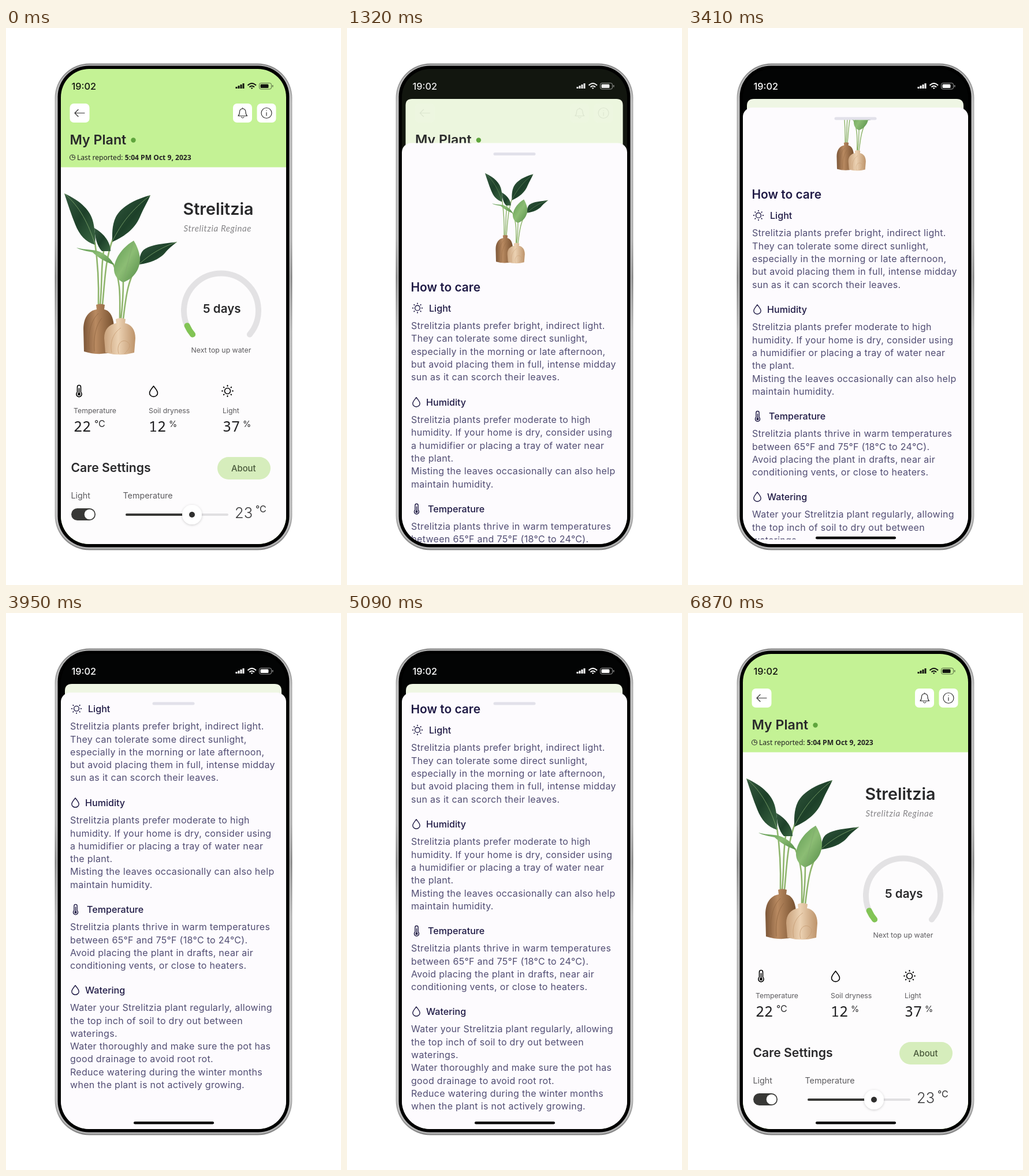
An HTML page for the animation above (6920 ms loop, 580x966 px).

```html
<!DOCTYPE html>
<html lang="en">
<head>
<meta charset="utf-8">
<title>Plant care app</title>
<style>
html, body { margin: 0; width: 100%; height: 100%; overflow: hidden; background: #fff }
svg { display: block; width: 580px; height: 966px; font-family: Inter, sans-serif }
.bold { font-weight: 600; fill: #29292b }
.label { font-size: 12.3px; fill: #5c5b5e }
.number { font: 25px "Noto Sans Mono", monospace; fill: #1f1f21 }
.unit { font-size: 16px; fill: #2c2c2e }
.percent { font-size: 14.5px; fill: #2c2c2e }
.setting { font-size: 14.3px; fill: #5c5b5e }
.icon { fill: none; stroke: currentColor; stroke-width: 1.6; stroke-linecap: round; stroke-linejoin: round }
.thin { fill: none; stroke: #333; stroke-width: 1.2; stroke-linecap: round; stroke-linejoin: round }
.stem { fill: none; stroke: #8fb56c; stroke-width: 2.6 }
.head { font-size: 16.1px; font-weight: 500; fill: #1f1a45 }
.para { font-size: 16px; letter-spacing: .3px; fill: #514d73 }
</style>
</head>
<body>
<svg viewBox="0 0 580 966">
<defs>
  <linearGradient id="metal" x2="0" y2="1">
    <stop stop-color="#858585"/><stop offset=".08" stop-color="#b0b0b0"/>
    <stop offset=".36" stop-color="#a9a9a9"/><stop offset=".44" stop-color="#7a7a7a"/>
    <stop offset=".55" stop-color="#b4b4b4"/>
    <stop offset=".93" stop-color="#b0b0b0"/><stop offset="1" stop-color="#808080"/>
  </linearGradient>
  <linearGradient id="dark" x2="1" y2="1">
    <stop stop-color="#34593f"/><stop offset=".5" stop-color="#1d4029"/><stop offset="1" stop-color="#3c6843"/>
  </linearGradient>
  <linearGradient id="pale" x2="1" y2="1">
    <stop stop-color="#5f9a52"/><stop offset=".5" stop-color="#8cbd74"/><stop offset="1" stop-color="#548c48"/>
  </linearGradient>
  <linearGradient id="walnut">
    <stop stop-color="#7c5638"/><stop offset=".4" stop-color="#b98a61"/><stop offset="1" stop-color="#76502f"/>
  </linearGradient>
  <linearGradient id="birch">
    <stop stop-color="#c9a27c"/><stop offset=".45" stop-color="#ecd2b3"/><stop offset="1" stop-color="#bd936a"/>
  </linearGradient>
  <filter id="soft" x="-50%" y="-50%" width="200%" height="200%">
    <feDropShadow dx="0" dy="1" stdDeviation="2" flood-opacity=".2"/>
  </filter>
  <clipPath id="screen"><rect x="95" y="71" width="390" height="824" rx="49"/></clipPath>
  <clipPath id="page"><rect x="95" y="159" width="390" height="728"/></clipPath>

  <g id="sun" class="icon">
    <circle r="5"/>
    <path id="rays" stroke-width="2"/>
  </g>
  <path id="drop" class="icon" d="M0-9C3-5 7-1 7 3A7 6.4 0 0 1-7 3C-7-1-3-5 0-9Z"/>
  <g id="thermo" class="icon">
    <path d="M-3 2.5V-6.5a3 3 0 0 1 6 0V2.5a4.6 4.6 0 1 1-6 0Z"/>
    <circle cy="6" r="1.6" fill="currentColor"/><path d="M0-4V5"/>
  </g>

  <g id="plant">
    <g class="stem">
      <path d="M160 480C161 440 158 400 154 372M163 480C167 440 164 410 170 382M167 480C171 440 172 400 185 366"/>
      <path d="M197 505C197 470 200 440 185 408M199 505C202 480 203 460 203 438M203 505C207 470 211 430 232 407"/>
    </g>
    <g fill="url(#dark)">
      <path d="M153 347C166 354 181 369 181 387L166 387C157 378 154 362 153 347Z"/>
      <path d="M101 287C128 299 149 317 152 342C155 358 155 370 154 376C138 371 127 359 120 341C113 324 107 305 101 287Z"/>
      <path d="M250 290C224 297 200 309 190 328C183 343 184 358 184 371C207 361 225 346 233 325C239 311 246 300 250 290Z"/>
      <path d="M296 371C275 374 250 375 238 385C231 392 231 402 231 410C250 408 268 400 277 388C284 380 290 376 296 371Z"/>
    </g>
    <g fill="url(#pale)">
      <path d="M122 381C140 386 150 383 162 388C174 393 183 402 187 411C170 405 157 396 150 389C140 387 129 385 122 381Z"/>
      <path d="M221 369C205 378 190 395 187 415C186 430 195 438 203 441C220 435 232 420 232 400C231 388 226 376 221 369Z"/>
    </g>
    <path d="M101 287C128 310 143 340 154 375M250 290C218 315 200 338 184 370M221 369C214 395 208 418 203 440M296 371C265 382 248 394 231 409" fill="none" stroke="#83ab70" opacity=".8"/>
    <path d="M156 480Q163 477 171 480L170 488C181 490 187 503 187 522L185 562Q160 569 135 561L134 522C134 503 143 490 157 488Z" fill="url(#walnut)"/>
    <path d="M144 558C141 530 147 507 160 495M153 561C151 535 156 515 166 503" fill="none" stroke="#8e643f" opacity=".7"/>
    <path d="M190 505Q198 501 207 505L206 512C217 514 224 523 224 538L222 563Q197 570 172 563L170 538C170 523 178 514 191 512Z" fill="url(#birch)"/>
    <path d="M183 563C179 543 187 528 199 520M195 565C190 546 203 538 211 545S209 561 205 565" fill="none" stroke="#c79d74" opacity=".8"/>
  </g>
</defs>

<rect x="84.5" y="61.5" width="411" height="844" rx="60" fill="url(#metal)"/>
<rect x="86.5" y="63.5" width="407" height="840" rx="58" fill="#d2d2d2" opacity=".6"/>
<rect x="89.5" y="65.5" width="401" height="835" rx="54"/>

<g clip-path="url(#screen)">
  <rect id="base" x="95" y="71" width="390" height="824"/>
  <path id="header"/>
  <rect id="body" x="95" y="241.5" width="390" height="654"/>

  <g id="left">
    <g class="fade">
      <rect x="110.5" y="131" width="34" height="33" rx="7" fill="#fff"/>
      <path class="thin" d="M136 147.5H119M125 141.5L119 147.5L125 153.5"/>
    </g>
    <text class="bold" x="110.5" y="202" font-size="23.2">My Plant</text>
    <circle cx="220.5" cy="194.5" r="4.2" fill="#5fa53d"/>
    <g class="thin"><circle cx="115" cy="224.5" r="4.5"/><path d="M115 221.5V224.5H118"/></g>
    <text x="123" y="228.5" font-size="12.1" font-family="Noto Sans, sans-serif" fill="#222">Last reported: <tspan font-weight="600">5:04 PM Oct 9, 2023</tspan></text>
  </g>
  <g id="right" class="fade">
    <rect x="393" y="131" width="33" height="33" rx="7" fill="#fff"/>
    <rect x="434.5" y="131" width="33" height="33" rx="7" fill="#fff"/>
    <path class="thin" d="M402 152.5Q404.5 150 404.5 145A5.2 5.2 0 0 1 414.9 145Q415 150 417.5 152.5ZM409.7 139.8V138.5M407.5 154.5Q409.7 157.5 412 154.5"/>
    <g class="thin"><circle cx="451" cy="147.5" r="9"/><path d="M451 146.5V152M451 143.2V143.3"/></g>
  </g>

  <g id="home">
    <use href="#plant"/>
    <text class="bold" x="306.5" y="324" font-size="28.7">Strelitzia</text>
    <text x="307.5" y="353" font-size="15" font-family="Lato, sans-serif" font-style="italic" letter-spacing=".6" fill="#858487">Strelitzia Reginae</text>
    <rect x="301" y="419" width="144" height="122" fill="#fdfcfd"/>
    <g fill="none" stroke-width="10" stroke-linecap="round">
      <path d="M323.1 531.5A64.5 64.5 0 1 1 421.9 531.5" stroke="#e3e2e4"/>
      <path d="M323.1 531.5A64.5 64.5 0 0 1 313.6 516.2" stroke="#82c455"/>
    </g>
    <text class="bold" x="341" y="493.5" font-size="20.6">5 days</text>
    <text class="label" x="320.5" y="563">Next top up water</text>

    <use href="#thermo" x="126.5" y="629"/>
    <use href="#drop" x="255.5" y="630"/>
    <use href="#sun" x="383.5" y="629.5"/>
    <text class="label" x="117" y="667.5">Temperature</text>
    <text class="label" x="247" y="667.5">Soil dryness</text>
    <text class="label" x="375" y="667.5">Light</text>
    <text class="number" x="117" y="700">22</text>
    <text class="number" x="247" y="700">12</text>
    <text class="number" x="375" y="700">37</text>
    <text class="unit" x="153" y="692">°C</text>
    <text class="percent" x="282" y="692">%</text>
    <text class="percent" x="410" y="692">%</text>

    <text class="bold" x="112.5" y="770" font-size="21.2">Care Settings</text>
    <rect x="366" y="744" width="92" height="39" rx="19.5" fill="#d6edbc"/>
    <text x="390" y="769" font-size="14.8" font-weight="500" fill="#48583a">About</text>
    <text class="setting" x="112.5" y="815.5">Light</text>
    <text class="setting" x="202.5" y="815.5">Temperature</text>
    <rect x="113" y="833" width="42" height="21" rx="10.5" fill="#383836"/>
    <circle cx="144.5" cy="843.5" r="8.8" fill="#fff"/>
    <g stroke-width="4" stroke-linecap="round">
      <path d="M209 844H383" stroke="#e1e0e2"/><path d="M209 844H322" stroke="#383836"/>
    </g>
    <circle cx="322" cy="844" r="17" fill="#fff" filter="url(#soft)"/>
    <circle cx="322" cy="844" r="5" fill="#2f2f2e"/>
    <text x="396" y="849.5" font-size="25.5" font-weight="300" fill="#3c3c3e">23</text>
    <text class="unit" x="432" y="840">°C</text>
  </g>

  <g id="sheet">
    <rect x="95" y="138" width="390" height="840" rx="16" fill="#fdfbfe"/>
    <g clip-path="url(#page)">
      <g id="scroll" color="#1f1a45">
        <use href="#plant" transform="translate(182.4 10.3) scale(.56)"/>
        <text x="110.5" y="376" font-size="20.9" font-weight="600" fill="#1f1a45">How to care</text>
      </g>
    </g>
    <rect x="253.5" y="154.5" width="73" height="5" rx="2.5" fill="#e2e1ea"/>
  </g>

  <g id="status">
    <text x="113.5" y="106.5" font-size="16.3" font-weight="500" fill="currentColor">19:02</text>
    <path d="M399 105V102M403 105V100M407 105V98M411 105V96" stroke="currentColor" stroke-width="3"/>
    <g fill="none" stroke="currentColor" stroke-width="2">
      <path d="M418.5 99.5Q425.7 92.5 433 99.5M421.5 102.5Q425.7 98.5 430 102.5"/>
      <path d="M425.7 106L423.8 104Q425.7 102.5 427.6 104Z" fill="currentColor" stroke-width="0"/>
      <rect x="438.5" y="95.5" width="21" height="10.5" rx="3" stroke-width="1" opacity=".6"/>
      <path d="M461.7 99V102.5" stroke-width="1.5" opacity=".6"/>
    </g>
    <rect x="440.5" y="97.5" width="14" height="6.5" rx="1.5" fill="currentColor"/>
  </g>
  <rect id="bar" x="221" y="882" width="139" height="4.5" rx="2.25"/>
</g>
</svg>
<script>
const $ = id => document.getElementById(id);
const LOOP = 6920, LINE = 22.3;

// icon, title, middle of the title line, icon x, title x, text
const tips = [
  ['sun', 'Light', 405, 122, 142, `Strelitzia plants prefer bright, indirect light.
They can tolerate some direct sunlight,
especially in the morning or late afternoon,
but avoid placing them in full, intense midday
sun as it can scorch their leaves.`],
  ['drop', 'Humidity', 568, 120, 137, `Strelitzia plants prefer moderate to high
humidity. If your home is dry, consider using
a humidifier or placing a tray of water near
the plant.
Misting the leaves occasionally can also help
maintain humidity.`],
  ['thermo', 'Temperature', 753, 120.5, 140, `Strelitzia plants thrive in warm temperatures
between 65°F and 75°F (18°C to 24°C).
Avoid placing the plant in drafts, near air
conditioning vents, or close to heaters.`],
  ['drop', 'Watering', 893, 120, 137, `Water your Strelitzia plant regularly, allowing
the top inch of soil to dry out between
waterings.
Water thoroughly and make sure the pot has
good drainage to avoid root rot.
Reduce watering during the winter months
when the plant is not actively growing.`],
];
$('scroll').innerHTML += tips.map(([icon, title, y, iconX, x, text]) =>
  `<use href="#${icon}" transform="translate(${iconX} ${y}) scale(.88)"/>` +
  `<text class="head" x="${x}" y="${y + 6}">${title}</text>` +
  text.split('\n').map((line, i) =>
    `<text class="para" x="111" y="${y + 36.5 + i * LINE}">${line}</text>`).join('')
).join('');

$('rays').setAttribute('d', Array.from({ length: 8 }, (_, i) => {
  const c = Math.cos(i * Math.PI / 4), s = Math.sin(i * Math.PI / 4);
  return `M${8.6 * c} ${8.6 * s}L${9.4 * c} ${9.4 * s}`;
}).join(''));

// Every move takes 16 visible steps and slows towards its end.
function move(t, start) {
  const step = Math.floor((t - start + 7) / 45.33) + 1;
  return 1 - (1 - Math.min(16, Math.max(0, step)) / 16) ** 1.85;
}

const mix = (a, b, k) => `rgb(${a.map((v, i) => v + (b[i] - v) * k)})`;
const shift = (id, x, y) => $(id).setAttribute('transform', `translate(${x} ${y})`);

function draw(t) {
  const opened = move(t, 820), open = opened - move(t, 5730);
  const x = 95 + 7 * open, w = 390 - 15 * open, r = 12 * open;

  $('base').setAttribute('fill', mix([196, 242, 149], [3, 4, 4], open));
  $('header').setAttribute('fill', mix([196, 242, 149], [239, 246, 228], open));
  $('header').setAttribute('d', `M${x} 242V${123 + r}q0 ${-r} ${r} ${-r}h${w - 2 * r}q${r} 0 ${r} ${r}V242Z`);
  $('body').setAttribute('fill', mix([253, 252, 253], [184, 182, 186], open));

  shift('left', 8 * open, 0);
  shift('right', -7.5 * open, 0);
  document.querySelectorAll('.fade').forEach(e => e.setAttribute('opacity', 1 - open));
  $('home').setAttribute('opacity', 1 - open);
  $('status').setAttribute('color', mix([18, 20, 16], [255, 255, 255], open));

  shift('sheet', 0, 800 * (1 - open));
  // The content trails the sheet a little while it rises, then scrolls.
  const scrolled = 90.8 * move(t, 2770) + 179.5 * move(t, 3500) - 58 * move(t, 4230);
  shift('scroll', 0, 10.2 + 116 * (1 - opened) - scrolled);
  $('bar').setAttribute('opacity', t < 1550 ? 0 : 1);
}

function tick() {
  draw(performance.now() % LOOP);
  requestAnimationFrame(tick);
}
tick();
</script>
</body>
</html>
```
